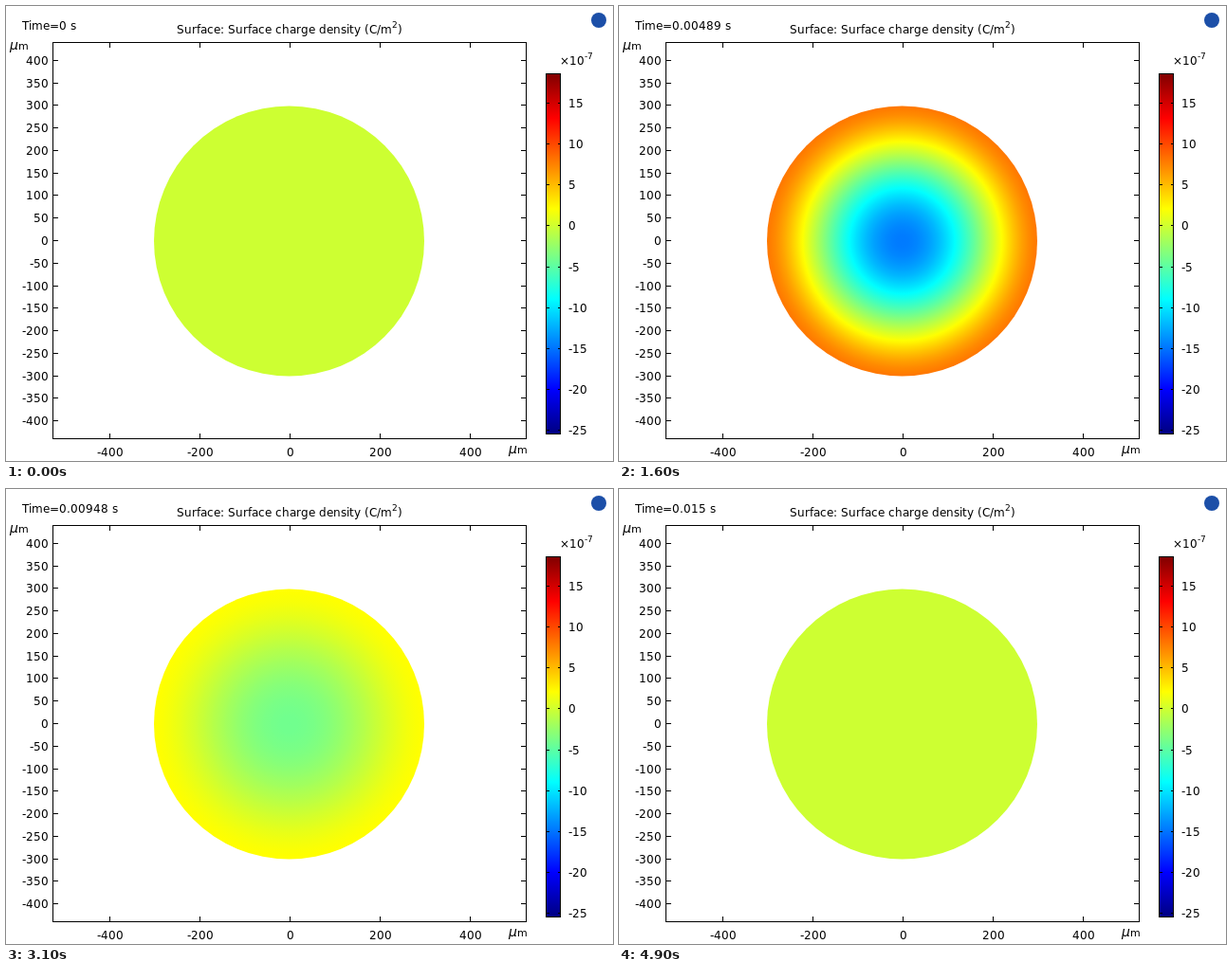
An HTML page with a canvas for the animation above (5000 ms loop, 640 px wide and 480 px high).

```html
<!DOCTYPE html>
<html lang="en">
<head>
<meta charset="utf-8">
<title>Surface charge density</title>
<style>
  html, body { margin: 0; width: 100%; height: 100%; overflow: hidden; background: #fff; }
  canvas { display: block; }
</style>
</head>
<body>
<canvas id="stage" width="640" height="480"></canvas>
<script>
const ctx = document.getElementById('stage').getContext('2d');
const MIN = -25.4, MAX = 18.7;
const STEP = 100, STEPS = 50, END = 0.015;
const CX = 298.5, CY = 248, RADIUS = 142.5;
const SCALE = 0.4755;  // pixels per micrometre

// Charge at the centre of the disc: [step, value]
const KEYS = [[0, 0], [4, 2], [8, 10], [11, 18.6], [13, -25.4], [16, -14.6],
  [20, -9.5], [24, -6.4], [31, -4], [36, -1.3], [42, -0.3], [49, 0]];

function centreCharge(n) {
  const i = Math.max(1, KEYS.findIndex(k => k[0] >= n));
  const [n0, v0] = KEYS[i - 1], [n1, v1] = KEYS[i];
  return v0 + (v1 - v0) * (n - n0) / (n1 - n0);
}

// Radial profile, u = (r / radius) squared
const profile = u => 1 - 2.78 * u + 1.23 * u * u;

function rainbow(p) {
  const channel = peak =>
    Math.round(255 * Math.min(1, Math.max(0, 1.5 - Math.abs(4 * p - peak))));
  return `rgb(${channel(3)},${channel(2)},${channel(1)})`;
}
const colour = v => rainbow(Math.min(1, Math.max(0, (v - MIN) / (MAX - MIN))));

function fillStops(gradient, valueAt) {
  for (let i = 0; i <= 64; i++) gradient.addColorStop(i / 64, colour(valueAt(i / 64)));
  ctx.fillStyle = gradient;
}

// Text on whole-pixel advances; align is the part of the width left of x
function text(s, x, y, align = 0, font = '12px') {
  ctx.font = font + ' "DejaVu Sans", sans-serif';
  ctx.fillStyle = '#000';
  const chars = [...String(s)];
  const widths = chars.map(c => Math.round(ctx.measureText(c).width));
  x = Math.round(x - align * widths.reduce((a, b) => a + b));
  chars.forEach((c, i) => {
    ctx.fillText(c, x, y);
    x += widths[i];
  });
}

function dot(x, y, r) {
  ctx.beginPath();
  ctx.arc(x, y, r, 0, 2 * Math.PI);
  ctx.fill();
}

const hLine = (x, y, w) => ctx.fillRect(x, y, w, 1);
const vLine = (x, y, h) => ctx.fillRect(x, y, 1, h);

function unit(x, y) {
  text('μ', x, y, 0, 'italic 14px');
  text('m', x + 9, y, 0, '11px');
}

function axes() {
  ctx.strokeStyle = '#000';
  ctx.lineWidth = 1;
  ctx.strokeRect(49.5, 38.5, 499, 418);
  for (let v = -400; v <= 400; v += 50) {
    const y = Math.floor(247.5 - v * SCALE);
    text(v, 45, y + 5, 1);
    hLine(50, y, 5);
    hLine(543, y, 5);
  }
  for (let v = -400; v <= 400; v += 200) {
    const x = 299.2 + v * SCALE;
    text(v, x + 0.8, 475, 0.5);
    vLine(Math.floor(x), 39, 5);
    vLine(Math.floor(x), 451, 5);
  }
  unit(4, 46);
  unit(530, 472);
}

function colourBar() {
  fillStops(ctx.createLinearGradient(0, 452, 0, 71), p => MIN + p * (MAX - MIN));
  ctx.fillRect(569, 71, 16, 381);
  ctx.strokeRect(569.5, 71.5, 15, 380);
  for (let v = -25; v <= 15; v += 5) {
    const y = Math.floor(231.9 - v * 8.63);
    text(v, 593, y + 5);
    hLine(570, y, 3);
    hLine(582, y, 3);
  }
  text('×10', 584, 62);
  text('-7', 610, 56, 0, '9px');
}

function timeLabel(n) {
  const s = n * END / (STEPS - 1);
  if (n > 0 && s < 0.001) return (Math.floor(s * 1e8) / 1e4) + 'E-4';
  return Math.floor(s * 1e5 + 1e-6) / 1e5;
}

function draw(n) {
  ctx.fillStyle = '#fff';
  ctx.fillRect(0, 0, 640, 480);

  const charge = centreCharge(n);
  fillStops(ctx.createRadialGradient(CX, CY, 0, CX, CY, RADIUS), r => charge * profile(r * r));
  dot(CX, CY, RADIUS);

  axes();
  colourBar();
  text(`Time=${timeLabel(n)} s`, 17, 25);
  text('Surface: Surface charge density (C/m', 180, 29);
  text('2', 407, 23, 0, '9px');
  text(')', 413, 29);

  ctx.fillStyle = '#1c4fa8';
  dot(625, 15, 8);
}

const start = performance.now();
function tick() {
  draw(Math.floor((performance.now() - start) / STEP) % STEPS);
  requestAnimationFrame(tick);
}
tick();
</script>
</body>
</html>
```
